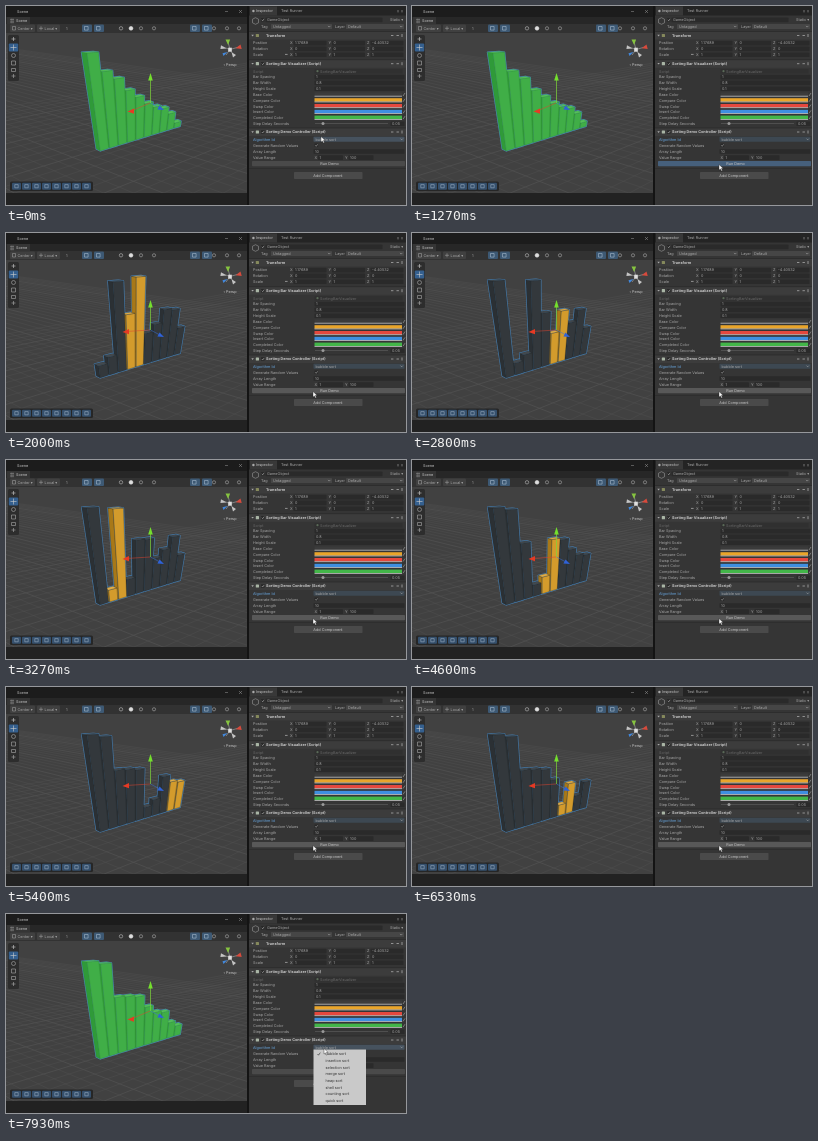
Write an HTML page that moves like this. It is 400 px wide and 199 px high and loops after 8 s.

```html
<!DOCTYPE html>
<html lang="en">
<head>
<meta charset="utf-8">
<title>Sorting demo</title>
<style>
html, body { margin: 0; width: 100%; height: 100%; overflow: hidden; background: #1c1c1c; }
svg { display: block; width: 100vw; height: 100vh; fill: #a8a8a8; }
text { font-family: Inter, Roboto, sans-serif; font-size: 3.8px; white-space: pre; text-rendering: geometricPrecision; }
</style>
</head>
<body>
<svg id="stage" viewBox="0 0 400 199" preserveAspectRatio="none"></svg>
<script>
const LOOP = 8000, COUNT = 10;
const stage = document.getElementById('stage');

function add(tag, attrs, parent = stage) {
  const el = document.createElementNS('http://www.w3.org/2000/svg', tag);
  for (const key in attrs) el.setAttribute(key, attrs[key]);
  parent.appendChild(el);
  return el;
}
const rect = (x, y, width, height, fill, parent, rx = 0) =>
  add('rect', { x, y, width, height, fill, rx }, parent);
const path = (d, stroke, width = 0.6, fill = 'none', parent) =>
  add('path', { d, stroke, 'stroke-width': width, fill }, parent);
const ring = (cx, cy, r, stroke, fill = 'none') =>
  add('circle', { cx, cy, r, fill, stroke, 'stroke-width': 0.6 });
function label(x, y, str, opts = {}, parent) {
  const el = add('text', { x, y: y + 1.4, ...opts }, parent);
  el.textContent = str;
  return el;
}

// Scene view
rect(0, 0, 241, 199, '#222');
rect(0, 0, 241, 11, '#1c1c1c');
label(11, 6, 'Scene', { fill: '#c8c8c8' });
path('M219 5.5h3M233 4l3 3m0-3l-3 3', '#999', 0.5);
rect(0, 11, 241, 176, '#414141');

const HORIZON = -5, VANISH = 579;
add('clipPath', { id: 'floor' }).innerHTML = '<rect x="0" y="27" width="241" height="160"/>';
const grid = add('g', { opacity: 0.11, 'clip-path': 'url(#floor)' });
for (let i = -24; i < 40; i++) {
  const x = i * 52;
  path(`M${VANISH} ${HORIZON}L${x} 330M-330 ${HORIZON}L${x} 330`, '#c8c8c8', i % 5 ? 0.45 : 0.8, 'none', grid);
}

rect(0, 11, 241, 7, '#272727');
rect(1, 11, 23, 7, '#353535');
path('M4 13.6h4M4 16h4M5.2 12.4v5M7 12.4v5', '#aaa', 0.4);
label(10, 15, 'Scene', { fill: '#c8c8c8' });
rect(0, 18, 241, 9, '#323232');
rect(4, 18.5, 25, 7.5, '#404040', stage, 1);
rect(31, 18.5, 23, 7.5, '#404040', stage, 1);
path('M6.5 20.5h3v3.5h-3z', '#aaa', 0.5);
label(11.5, 22.3, 'Center ▾');
path('M33 22.3h4m-2-2v4', '#aaa', 0.5);
label(38.5, 22.3, 'Local ▾');
label(60, 22.3, '1');
for (const x of [76, 88, 184, 196]) {
  rect(x, 18.5, 10, 7.5, '#3d5974', stage, 1);
  path(`M${x + 2.5} 20.5h3.6v3.6h-3.6z`, '#b9cbdc', 0.5);
}
ring(115, 22.3, 1.7, '#bbb');
ring(125, 22.3, 1.9, '#ddd', '#ddd');
for (const x of [135, 148, 208, 221, 233]) ring(x, 22.3, 1.6, '#aaa');

rect(2, 29, 11, 46, '#2d2d2d', stage, 1.5);
rect(2.8, 37.5, 9.4, 8, '#35608f', stage, 1);
path('M5.5 33h4m-2-2v4M4.5 41.5h6m-3-3v6', '#ccc', 0.6);
ring(7.5, 49.5, 2, '#aaa');
path('M5.5 55h4v4h-4zM5.5 62.5h4v3h-4zM5.5 70h4m-2-2v4', '#aaa', 0.6);

rect(4, 175.5, 83, 9.5, '#262626', stage, 1.5);
for (let i = 0; i < 8; i++) {
  const x = 6 + i * 10;
  rect(x, 176.7, 9, 7, '#35506d', stage, 1);
  path(`M${x + 2.8} 178.6h3.4v3.2h-3.4z`, '#a9bbcc', 0.5);
}

// Orientation gizmo
path('M224 43.5L222 36M224 43.5L233 41M224 43.5L217 41M224 43.5L228 50M224 43.5L220 49', '#aaa', 0.6);
path('M219.5 33.5h4.6l-2 5.4z', 'none', 0, '#86c440');
path('M234.5 38.5l1.2 4.4-6-.6z', 'none', 0, '#d84a3c');
path('M217.5 50l4-4-5 1.2z', 'none', 0, '#4389dd');
path('M215 39.2l-.6 3.8 6-.6zM230 49l-3 2.4-1.4-5.2z', 'none', 0, '#c4c4c4');
rect(222.2, 41.7, 3.6, 4, '#dedede');
label(224, 59, '‹ Persp', { 'text-anchor': 'middle', fill: '#c8c8c8' });

const outline = path('', '#4a88c0', 1.4);
outline.setAttribute('stroke-linejoin', 'round');
const bars = [];
for (let i = COUNT - 1; i >= 0; i--) {
  bars[i] = ['side', 'front', 'top'].map(() => path('', 'none', 0.3));
}

// Move handles
path('M144.5 97V74', '#7fd63a', 0.7);
path('M142.2 74.5h4.6l-2.3-7.5z', 'none', 0, '#74df2d');
const redLine = path('', '#e0432e', 0.5);
const redTip = path('M-3.5 .6L3-2.4 3 2.8z', 'none', 0, '#e63a24');
path('M144.5 97L153 101.5', '#3c72d8', 0.5);
path('M158 104l-6.6-.6 2.2-4z', 'none', 0, '#2f62d8');

// Inspector
rect(241, 0, 2, 199, '#141414');
rect(243, 0, 157, 199, '#353535');
rect(243, 0, 157, 9.5, '#242424');
rect(244, 0.5, 27, 9, '#383838');
add('circle', { cx: 247.4, cy: 5, r: 1.2, fill: '#aaa' });
label(250, 5, 'Inspector', { fill: '#c8c8c8' });
label(275, 5, 'Test Runner');
path('M392 4v2.4M396 4v2.4', '#999', 0.7);

const field = (x, y, w, str) => {
  rect(x, y - 2.2, w, 4.6, '#2a2a2a', stage, 0.6);
  label(x + 1.5, y, str);
};
const check = (x, y) => {
  rect(x, y - 1.8, 3.6, 3.6, '#282828', stage, 0.5);
  path(`M${x + 0.8} ${y}l.9 1 1.4-2`, '#ccc', 0.5);
};
const header = (y, str, color) => {
  rect(243, y - 4, 157, 8, '#3c3c3c');
  path(`M243 ${y - 4}h157`, '#222', 0.5);
  path(`M245.3 ${y - 0.7}h2.6l-1.3 1.6z`, 'none', 0, '#aaa');
  rect(249.8, y - 1.6, 3.2, 3.2, color, stage, 0.6);
  label(260, y, str, { 'font-weight': 700, fill: '#c8c8c8' });
  path(`M385 ${y}h2.4M390.5 ${y}h2.4M396 ${y - 1.5}v3`, '#aaa', 0.8);
};
const popup = (x, y, w, str) => {
  const box = rect(x, y - 2.4, w, 4.9, '#464646', stage, 0.6);
  label(x + 2, y, str);
  path(`M${x + w - 4} ${y - 0.6}l1.2 1.2 1.2-1.2`, '#bbb', 0.5);
  return box;
};

path('M246.5 13.2l3-1.5 3 1.5v3.6l-3 1.5-3-1.5z', '#999', 0.6);
check(255, 13.8);
field(259.5, 13.8, 117, 'GameObject');
label(384, 13.8, 'Static ▾');
label(255, 20.5, 'Tag');
popup(265, 20.5, 61, 'Untagged');
label(329, 20.5, 'Layer');
popup(340, 20.5, 58, 'Default');

header(29.5, 'Transform', '#85895c');
[['Position', '1.17689', '0', '-4.40532'], ['Rotation', '0', '0', '0'], ['Scale', '1', '1', '1']]
  .forEach(([name, ...values], row) => {
    const y = 37 + row * 5.8;
    label(247, y, name);
    values.forEach((value, i) => {
      const x = 284 + i * 38.5;
      label(x, y, 'XYZ'[i]);
      field(x + 3.5, y, 33, value);
    });
  });
path('M279 48.4h2.6', '#aaa', 0.8);

header(57.7, 'Sorting Bar Visualizer (Script)', '#a9b5a5');
check(255, 57.7);
label(247, 65.2, 'Script', { fill: '#6a6a6a' });
rect(308.5, 63, 88, 4.6, '#303030', stage, 0.6);
label(314, 65.2, 'SortingBarVisualizer', { fill: '#6a6a6a' });
add('circle', { cx: 311.5, cy: 65.2, r: 1.1, fill: '#5a6a58' });
[['Bar Spacing', '1'], ['Bar Width', '0.8'], ['Height Scale', '0.1']].forEach(([name, value], i) => {
  const y = 71 + i * 5.8;
  label(247, y, name);
  field(308.5, y, 90, value);
});
[['Base Color', '#3b3b3b'], ['Compare Color', '#e9a52b'], ['Swap Color', '#e4483e'],
 ['Insert Color', '#3f8fe0'], ['Completed Color', '#43b649']].forEach(([name, color], i) => {
  const y = 88.5 + i * 5.8;
  label(247, y, name);
  rect(308.5, y - 2.1, 87.5, 3.4, color);
  rect(308.5, y + 1.3, 87.5, 0.7, '#d8d8d8');
  path(`M397 ${y + 1.5}l2-3`, '#aaa', 0.6);
});
label(247, 117.6, 'Step Delay Seconds');
rect(309, 117.2, 73, 0.8, '#555');
add('circle', { cx: 317, cy: 117.6, r: 1.5, fill: '#999' });
field(384.5, 117.6, 14, '0.05');

header(126, 'Sorting Demo Controller (Script)', '#a9b5a5');
check(255, 126);
label(247, 133.2, 'Algorithm Id', { fill: '#6aa9e4' });
const algorithmBox = popup(307.5, 133.2, 91, 'bubble sort');
label(247, 139.3, 'Generate Random Values');
check(308.5, 139.3);
label(247, 145.4, 'Array Length');
field(307.5, 145.4, 91, '10');
label(247, 151.5, 'Value Range');
label(308.5, 151.5, 'X');
field(312, 151.5, 25, '1');
label(339, 151.5, 'Y');
field(342.5, 151.5, 25, '100');
const runButton = rect(246, 154.9, 153, 5.4, '#4a4a4a', stage, 0.8);
label(323.5, 157.6, 'Run Demo', { 'text-anchor': 'middle', fill: '#c8c8c8' });
path('M243 162.5h157', '#262626', 0.5);
rect(288, 166, 68.5, 7, '#4a4a4a', stage, 0.8);
label(322, 169.5, 'Add Component', { 'text-anchor': 'middle', fill: '#c8c8c8' });

const menu = add('g', {});
rect(307.5, 135.5, 52.5, 55.5, '#c9c9c9', menu);
['bubble sort', 'insertion sort', 'selection sort', 'merge sort', 'heap sort', 'shell sort',
 'counting sort', 'quick sort'].forEach((name, i) =>
  label(319.5, 140 + i * 6.65, name, { fill: '#333' }, menu));
path('M311.5 140l1 1.2 1.8-2.6', '#222', 0.6, 'none', menu);

const cursor = path('M0 0V5.6L1.4 4.4 2.4 6.6 3.4 6.1 2.4 4H4.2Z', '#222', 0.4, '#fff');

// Bubble sort runs from the right end to the left; states[n] precedes comparison n.
const earlier = [98, 78, 69, 55, 46, 37, 31, 27, 19, 6];
const shuffled = [12, 18, 94, 58, 34, 42, 57, 97, 32, 55];
const states = [], list = shuffled.slice();
for (let end = 0; end < COUNT - 1; end++) {
  for (let i = COUNT - 1; i > end; i--) {
    states.push({ values: list.slice(), pair: i });
    if (list[i] > list[i - 1]) [list[i], list[i - 1]] = [list[i - 1], list[i]];
  }
}

// Perspective along the row, with uprights spreading towards the top
function point(u, height, back) {
  const k = 1 / (1 + 0.2 * u), h = height * k;
  let x = VANISH - (VANISH - 94) * k, y = HORIZON + 150 * k - h;
  if (back) {
    x -= 4 * k;
    y -= 2 * k * (1 - h / 150);
  }
  x += (x - 130) * 0.0038 * h;
  return `${x.toFixed(2)} ${y.toFixed(2)}`;
}
const quad = (...points) => `M${points.join('L')}Z`;

const palette = {
  base: ['#2b3034', '#33383c', '#43494e'],
  compare: ['#a87818', '#d39b2c', '#e0ad48'],
  done: ['#2f9a39', '#40ae47', '#55c05a']
};

function drawBars(values, pair, done) {
  let silhouette = '';
  values.forEach((v, i) => {
    const a = (i + 0.03) / COUNT, b = (i + 0.9) / COUNT;
    const faces = [
      quad(point(a, 0), point(a, v), point(a, v, 1), point(a, 0, 1)),
      quad(point(a, 0), point(a, v), point(b, v), point(b, 0)),
      quad(point(a, v), point(b, v), point(b, v, 1), point(a, v, 1))
    ];
    const tone = done ? 'done' : i === pair || i === pair - 1 ? 'compare' : 'base';
    faces.forEach((d, f) => {
      bars[i][f].setAttribute('d', d);
      bars[i][f].setAttribute('fill', palette[tone][f]);
      bars[i][f].setAttribute('stroke', done ? '#318c38' : '#24292d');
    });
    silhouette += faces.join('');
  });
  outline.setAttribute('d', silhouette);
  const [x, y] = done ? [125, 105] : [120, 98.5];
  redLine.setAttribute('d', `M144 97L${x} ${y}`);
  redTip.setAttribute('transform', `translate(${x} ${y})`);
}

// Linear interpolation in rows of [time, ...values]
function track(rows, t, ease = p => p) {
  const i = Math.max(1, rows.findIndex(row => row[0] > t));
  const [t0, ...from] = rows[i - 1], [t1, ...to] = rows[i];
  const p = ease((t - t0) / (t1 - t0));
  return from.map((v, n) => v + (to[n] - v) * p);
}
const smooth = p => p * p * (3 - 2 * p);

const pointer = [[0, 315, 130.5], [400, 315, 130.5], [800, 307, 158.5],
                 [7270, 307, 158.5], [7730, 318, 134.5], [LOOP, 318, 134.5]];
// Comparisons made so far; the pace varies a little between passes.
const progress = [[0, -1], [1280, -1], [1281, 0], [2800, 12.5], [3870, 22.5],
                  [5400, 35.5], [6530, 41.5], [7050, 45], [LOOP, 45]];

let shown = null;
function draw(t) {
  const step = Math.floor(track(progress, t)[0]);
  if (step !== shown) {
    shown = step;
    const state = states[step];
    if (state) drawBars(state.values, state.pair, false);
    else drawBars(step < 0 ? earlier : list, -1, true);
  }
  const [x, y] = track(pointer, t, smooth);
  cursor.setAttribute('transform', `translate(${x} ${y})`);
  const overRun = y > 154.9, pressed = t >= 1260 && t < 1400;
  runButton.setAttribute('fill', pressed ? '#46607c' : overRun ? '#585858' : '#4a4a4a');
  algorithmBox.setAttribute('fill', y < 136 ? '#46525e' : '#3d4852');
  menu.setAttribute('opacity', t < 7865 ? 0 : t < 7925 ? 0.5 : 1);
}

const start = performance.now();
function tick() {
  draw((performance.now() - start) % LOOP);
  requestAnimationFrame(tick);
}
tick();
</script>
</body>
</html>
```
